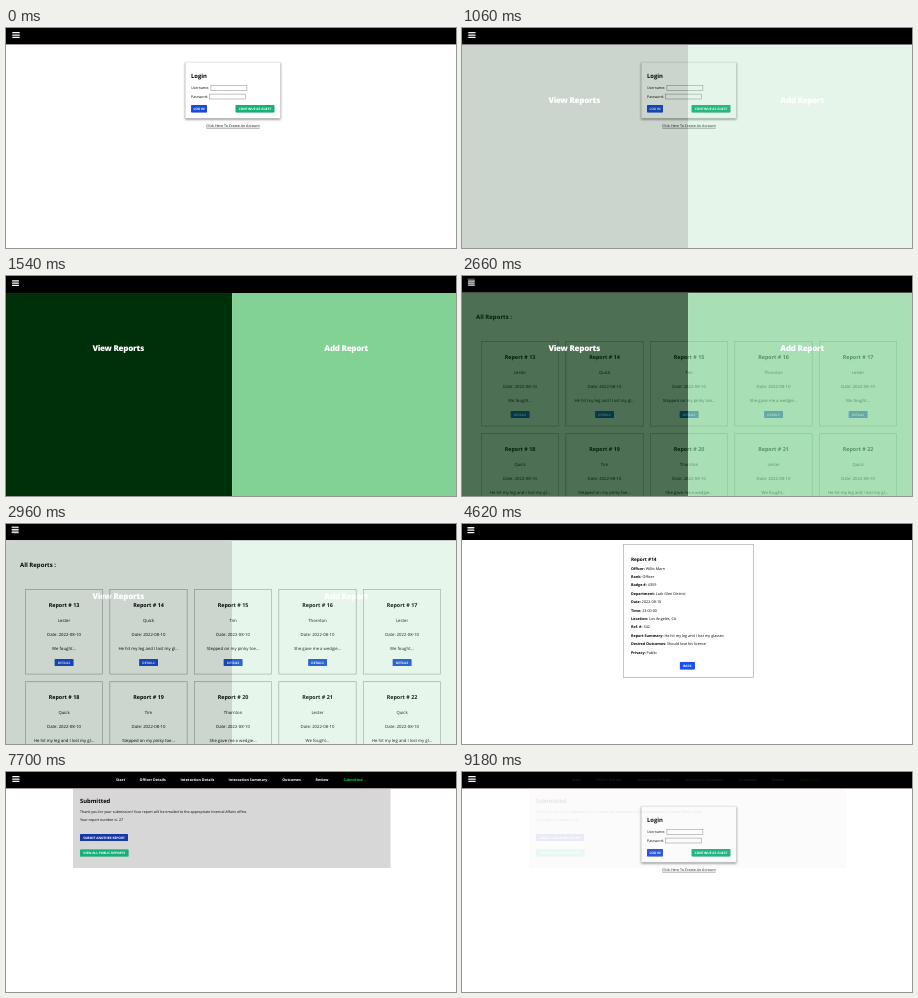
Recreate the animation shown at these times as an HTML page. Size 450 by 220 pixels, loop 9.24 s.

```html
<!DOCTYPE html>
<html lang="en">
<head>
<meta charset="utf-8">
<title>Report site walkthrough</title>
<style>
html, body { margin: 0; width: 100%; height: 100%; overflow: hidden; background: #fff; }
svg { display: block; width: 100vw; height: 100vh; }
text { font-family: "Open Sans", "Noto Sans", sans-serif; text-rendering: geometricPrecision; white-space: pre; }
.card { fill: #fff; stroke: #a8a8a8; stroke-width: .5; filter: drop-shadow(.7px .7px .5px rgba(0,0,0,.3)); }
.soft { filter: drop-shadow(0 1px 1.2px rgba(0,0,0,.5)); }
.btn { filter: drop-shadow(0 .4px .4px rgba(0,0,0,.25)); }
</style>
</head>
<body>
<svg id="stage" viewBox="0 0 450 220" xmlns="http://www.w3.org/2000/svg"></svg>
<script>
const HOLD = 1000, STEP = 60, SCENE = 1540;
const BLUE = '#1a49e0', GREEN = '#12b279';

const rect = (x, y, w, h, fill, more = '') =>
  `<rect x="${x}" y="${y}" width="${w}" height="${h}" fill="${fill}" ${more}/>`;

const text = (x, y, size, str, more = '') =>
  `<text x="${x}" y="${y}" font-size="${size}" ${more}>${str}</text>`;

const bold = (x, y, size, str, more = '') =>
  text(x, y, size, str, 'font-weight="700" ' + more);

const MIDDLE = 'text-anchor="middle"';

function button(x, y, w, h, label, fill) {
  return rect(x, y, w, h, fill, 'rx=".7" class="btn"') +
    bold(x + w / 2, y + h / 2 + 1.15, 3.2, label, `${MIDDLE} fill="#fff"`);
}

function header(height, x, y, w = 7.4, gap = 2.4) {
  let out = rect(0, 0, 450, 220, '#fff') + rect(0, 0, 450, height, '#000');
  for (let i = 0; i < 3; i++) out += rect(x, y + i * gap, w, 1.3, '#fff', 'rx=".3"');
  return out;
}

const headerEdge = () => rect(0, 16, 450, 1, '#a59b9f');

function login() {
  const field = (x, y) => rect(x, y, 36, 4.9, '#fff', 'stroke="#858585" stroke-width=".5"');
  return header(16, 6.3, 4) + headerEdge() +
    rect(179.3, 34.2, 95, 56, '#fff', 'class="soft" stroke="#d0d0d0" stroke-width=".3"') +
    bold(185, 50, 5.9, 'Login') +
    text(185, 60.8, 3.55, 'Username:') + field(204.9, 57.4) +
    text(185, 69.5, 3.55, 'Password:') + field(203.6, 66.1) +
    button(185, 77, 16, 7.4, 'LOG IN', BLUE) +
    button(229.6, 77, 38.8, 7.4, 'CONTINUE AS GUEST', GREEN) +
    text(227, 98.9, 3.6, 'Click Here To Create An Account', `${MIDDLE} text-decoration="underline"`);
}

function home() {
  const title = (x, str) => text(x, 75.3, 8,
    str, `${MIDDLE} fill="#fff" font-weight="800" letter-spacing="-.25"`);
  return header(17, 6.1, 4.2, 6.8, 2.3) +
    rect(0, 17, 226.2, 203, '#00300a') +
    rect(226.2, 17, 223.8, 203, '#82d296') +
    title(112.2, 'View Reports') + title(340.2, 'Add Report');
}

function reportCard(i) {
  const people = ['Lester', 'Quick', 'Tim', 'Thornton'];
  const notes = ['We fought...', 'He hit my leg and I lost my gl...',
    'Stepped on my pinky toe...', 'She gave me a wedgie...'];
  const x = 19.4 + (i % 5) * 84.5, y = 65.6 + Math.floor(i / 5) * 92.2, mid = x + 38.6;
  return rect(x, y, 77.2, 84.4, '#fff', 'class="card"') +
    bold(mid, y + 17.6, 5.4, 'Report # ' + (13 + i), MIDDLE) +
    text(mid, y + 32.1, 4.25, people[i % 4], MIDDLE) +
    text(mid, y + 46.3, 4.25, 'Date: 2022-08-10', MIDDLE) +
    text(mid, y + 60.4, 4.25, notes[i % 4], MIDDLE) +
    button(mid - 9.3, y + 69.5, 18.8, 7, 'DETAILS', BLUE);
}

function reports() {
  let out = header(16, 5.5, 2.6, 7.2, 2.5) + bold(14, 43.2, 6, 'All Reports :');
  for (let i = 0; i < 10; i++) out += reportCard(i);
  return out;
}

function details() {
  const rows = [
    ['Officer', 'Willis Marn'], ['Rank', 'Officer'], ['Badge #', '4359'],
    ['Department', 'Lark Glen District'], ['Date', '2022-08-10'], ['Time', '23:00:00'],
    ['Location', 'Los Angeles, CA'], ['Ref. #', '342'],
    ['Report Summary', 'He hit my leg and I lost my glasses'],
    ['Desired Outcomes', 'Should lose his license'], ['Privacy', 'Public']
  ];
  return header(16, 5.4, 3.1, 7, 2.4) +
    rect(161.5, 20.5, 129.9, 132.7, '#fff', 'class="card"') +
    bold(169, 37.1, 4.7, 'Report #14') +
    rows.map(([key, value], i) => text(169, 45.7 + i * 8.38, 3.72,
      `<tspan font-weight="700">${key}:</tspan> ${value}`)).join('') +
    button(217.9, 138.1, 15, 7.4, 'BACK', '#1a4cff');
}

function formPage(active, bottom) {
  const tabs = [['Start', 110], ['Officer Details', 133.6], ['Interaction Details', 174.5],
    ['Interaction Summary', 222.6], ['Outcomes', 276.2], ['Review', 309.5], ['Submitted', 337.5]];
  return header(16, 6.3, 4, 7.2) + headerEdge() +
    tabs.map(([name, x]) => bold(x, 8.6, 3.65, name,
      `fill="${name === active ? '#00d453' : '#fff'}"`)).join('') +
    rect(67, 17, 317.5, bottom - 17, '#d7d7d7') +
    bold(74, 31.2, 5.8, active);
}

function start() {
  const lines = [
    'Use this form to report an interaction with an officer. Every step can be changed until the report is sent.',
    'Have the name, rank and badge number of the officer ready, if you know them.',
    'Add the date, time and location of the interaction, and a short summary of what happened.',
    'Choose the outcome you would like to see, then review your answers.'
  ];
  return formPage('Start', 153) +
    lines.map((line, i) => text(74, 44 + i * 14, 3.6, line)).join('') +
    button(362, 139.6, 17, 7.2, 'NEXT', '#1537a8');
}

function submitted() {
  return formPage('Submitted', 96) +
    text(74, 41, 3.6, 'Thank you for your submission! Your report will be emailed to the appropriate Internal Affairs office.') +
    text(74, 49, 3.6, 'Your report number is: 27') +
    button(74, 62, 48, 7.1, 'SUBMIT ANOTHER REPORT', '#1537a8') +
    button(74, 77.6, 48.5, 7, 'VIEW ALL PUBLIC REPORTS', GREEN);
}

const stage = document.getElementById('stage');
const scenes = [login, home, reports, details, start, submitted].map(draw => {
  const g = document.createElementNS('http://www.w3.org/2000/svg', 'g');
  g.innerHTML = draw();
  return g;
});
let shown = -1;

// Each scene holds, then the next one fades in over it in tenths.
function render(ms) {
  const t = ms % (SCENE * scenes.length);
  const i = Math.floor(t / SCENE), rest = t % SCENE - HOLD;
  const now = scenes[i], next = scenes[(i + 1) % scenes.length];
  if (i !== shown) {
    stage.replaceChildren(now, next);
    now.setAttribute('opacity', 1);
    shown = i;
  }
  next.setAttribute('opacity', rest < 0 ? 0 : (Math.floor(rest / STEP) + 1) / 10);
}

function tick() {
  render(performance.now());
  requestAnimationFrame(tick);
}
tick();
</script>
</body>
</html>
```
